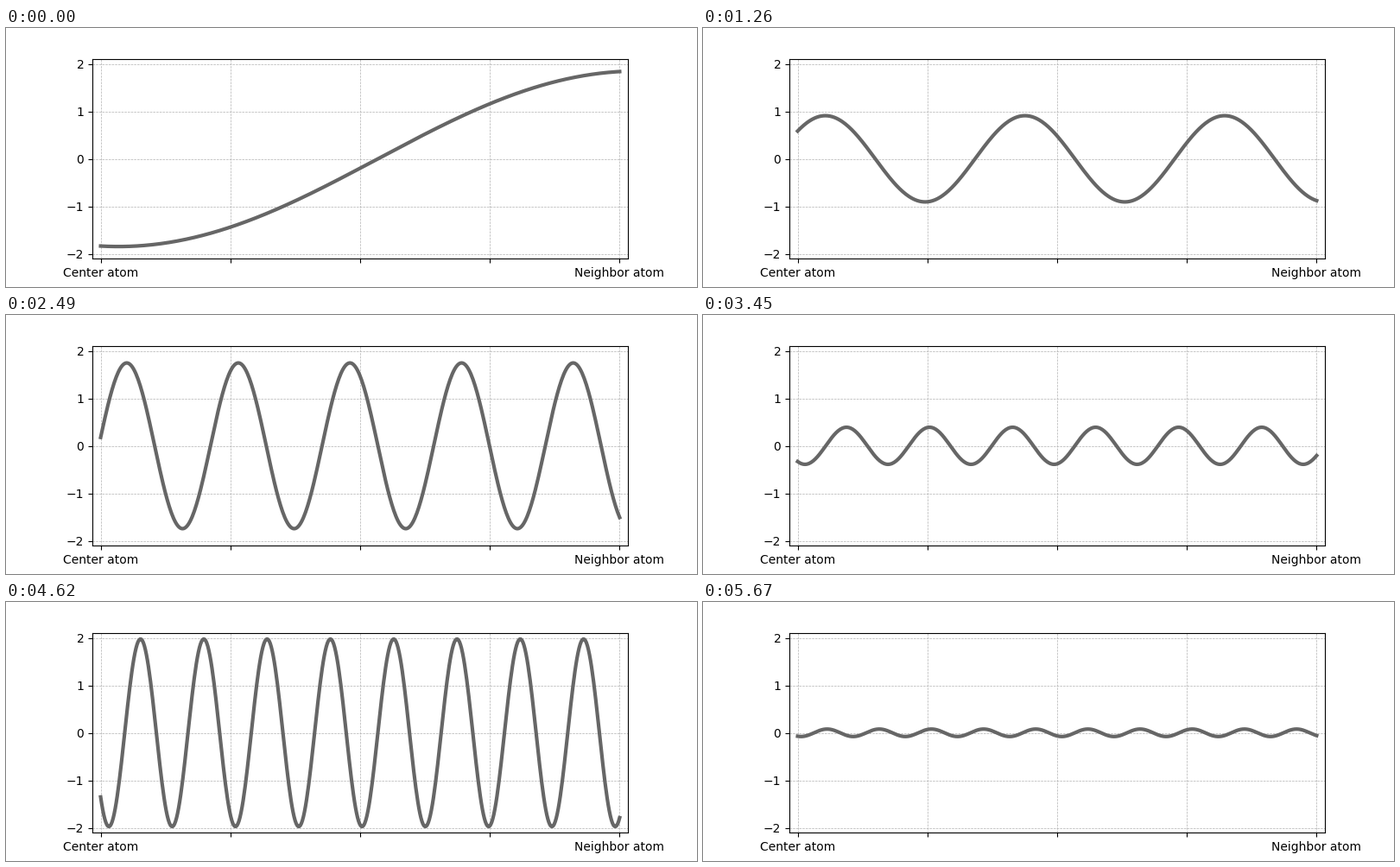
Write a matplotlib script that moves like this. It is 800 by 300 pixels and loops after 5.7 s.

```python
import numpy as np
import matplotlib.pyplot as plt
from matplotlib.animation import FuncAnimation

FRAMES = 190
INTERVAL = 30
TAU = 2 * np.pi

plt.rcParams["font.family"] = "DejaVu Sans"

x = np.linspace(0, TAU, 500)


def wave(i):
    """Sum of two sines a quarter turn apart, at a steadily rising frequency."""
    k = 0.5 + 0.05 * i
    return np.sin(k * (x - 1 - np.pi / 2)) + np.sin(k * (x - 1 - np.pi))


fig, ax = plt.subplots(figsize=(8, 3), dpi=100)
ax.set_xlim(-0.1, TAU + 0.1)
ax.set_ylim(-2.1, 2.1)
ax.set_xticks(np.linspace(0, TAU, 5))
ax.set_xticklabels(["Center atom", "", "", "", "Neighbor atom"])
ax.set_yticks(range(-2, 3))
ax.grid(linestyle="--", linewidth=0.5)

line, = ax.plot(x, wave(0), color="0.4", linewidth=3)


def update(i):
    line.set_ydata(wave(i))
    return line,


anim = FuncAnimation(fig, update, frames=FRAMES, interval=INTERVAL,
                     repeat=True, repeat_delay=0)

plt.show()
```
